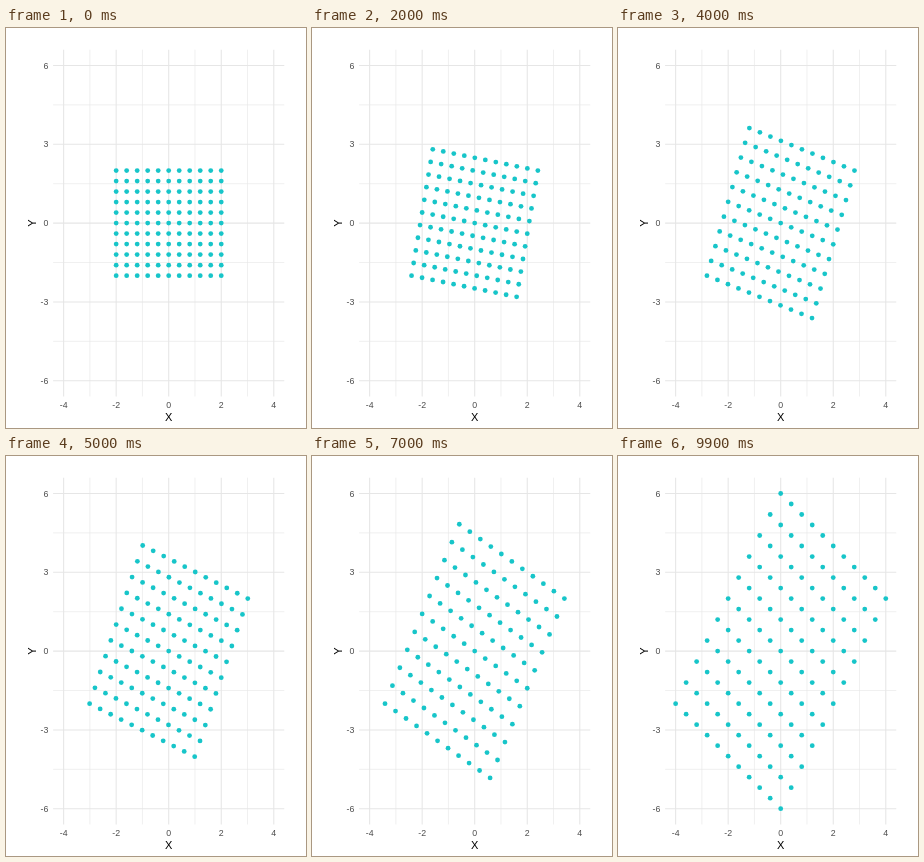
Write an HTML page with a canvas that moves like this. It is 300x400 px and loops after 10 s.

```html
<!DOCTYPE html>
<html>
<head>
<meta charset="utf-8">
<style>
html, body { margin: 0; width: 100%; height: 100%; overflow: hidden; background: #fff; }
canvas { display: block; width: 300px; height: 400px; }
</style>
</head>
<body>
<canvas></canvas>
<script>
const canvas = document.querySelector('canvas');
const ctx = canvas.getContext('2d');
const ratio = window.devicePixelRatio || 1;
canvas.width = 300 * ratio;
canvas.height = 400 * ratio;

const UNIT = 26.27, STEPS = 100, STEP_MS = 100;
const px = x => 162.7 + x * UNIT;
const py = y => 195.1 - y * UNIT;

function line(x1, y1, x2, y2, width) {
  ctx.lineWidth = width;
  ctx.beginPath();
  ctx.moveTo(px(x1), py(y1));
  ctx.lineTo(px(x2), py(y2));
  ctx.stroke();
}

function text(label, x, y, align, size, color) {
  ctx.font = `${size}px "Liberation Sans", Arial, sans-serif`;
  ctx.fillStyle = color;
  ctx.textAlign = align;
  ctx.fillText(label, x, y);
}

function drawAxes() {
  ctx.strokeStyle = '#e6e6e6';
  const column = (x, width) => line(x, -6.6, x, 6.6, width);
  const row = (y, width) => line(-4.4, y, 4.4, y, width);
  [-3, -1, 1, 3].forEach(x => column(x, 0.6));
  [-4.5, -1.5, 1.5, 4.5].forEach(y => row(y, 0.6));
  for (const x of [-4, -2, 0, 2, 4]) {
    column(x, 1.07);
    text(x, px(x), 380, 'center', 8.8, '#4d4d4d');
  }
  for (const y of [-6, -3, 0, 3, 6]) {
    row(y, 1.07);
    text(y, 42.3, py(y) + 3.2, 'right', 8.8, '#4d4d4d');
  }
  text('X', px(0), 393, 'center', 11, '#000');
  ctx.save();
  ctx.translate(29.6, py(0));
  ctx.rotate(-Math.PI / 2);
  text('Y', 0, 0, 'center', 11, '#000');
  ctx.restore();
}

// Blend from the identity to the matrix [[1, 1], [-1, 2]].
function drawDots(t) {
  ctx.fillStyle = '#17c5c9';
  for (let i = -5; i <= 5; i++) {
    for (let j = -5; j <= 5; j++) {
      const x = i * 0.4, y = j * 0.4;
      ctx.beginPath();
      ctx.arc(px(x + t * y), py(y + t * (y - x)), 2.4, 0, 2 * Math.PI);
      ctx.fill();
    }
  }
}

function draw() {
  const step = Math.floor(performance.now() / STEP_MS) % STEPS;
  ctx.setTransform(ratio, 0, 0, ratio, 0, 0);
  ctx.fillStyle = '#fff';
  ctx.fillRect(0, 0, 300, 400);
  drawAxes();
  drawDots(step / (STEPS - 1));
  requestAnimationFrame(draw);
}
draw();
</script>
</body>
</html>
```
